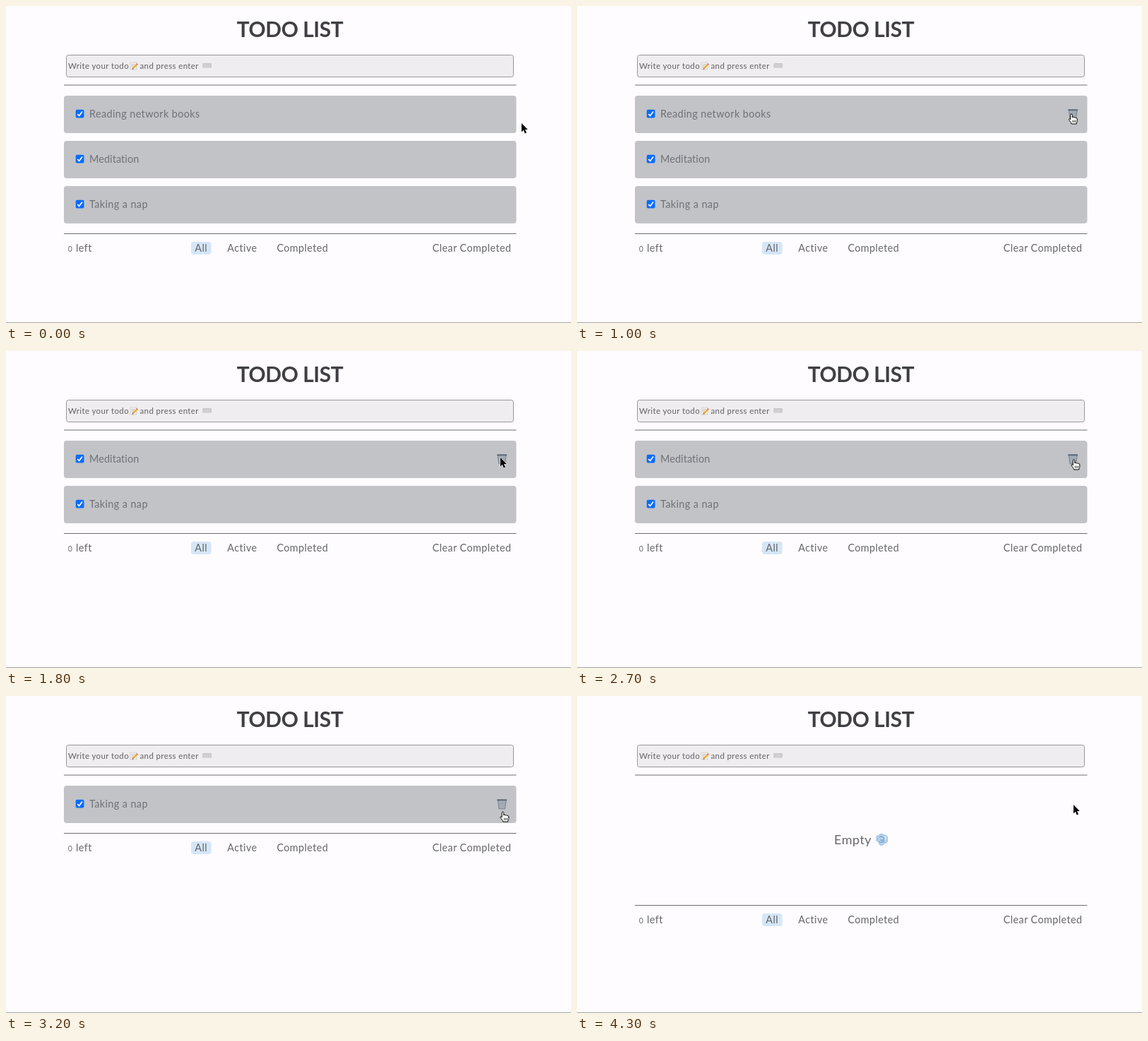
Recreate the animation shown at these times as an HTML page. Size 800 by 449 pixels, loop 6.9 s.

```html
<!DOCTYPE html>
<html lang="en">
<head>
<meta charset="utf-8">
<title>Todo list</title>
<style>
  html, body { margin: 0; width: 100%; height: 100%; overflow: hidden; background: #fefcff; }
  svg { display: block; width: 100%; height: 100%; }
  text { font: 400 14.4px Lato, "Open Sans", sans-serif; letter-spacing: .4px; fill: #66666a; }
  .title { font-size: 30px; font-weight: 700; letter-spacing: -.5px; fill: #3f3f44; }
  .hint { font-size: 11.5px; letter-spacing: .38px; fill: #626166; }
  .item { fill: #707176; }
  .tight { letter-spacing: .1px; }
  .zero { font: 400 10.6px Inter, sans-serif; }
  .empty { font-size: 18px; letter-spacing: .5px; }
  .rule { stroke: #6d6c70; stroke-width: 1; }
</style>
</head>
<body>
<svg viewBox="0 0 800 449">
  <defs>
    <g id="card">
      <rect x="82" y="127" width="640.5" height="53" rx="4" fill="#c2c3c7"/>
      <rect x="98.7" y="146.8" width="11.8" height="11.8" rx="2" fill="#0a6cff"/>
      <path d="M101.3 153l2.3 2.5 4.4-5.9" fill="none" stroke="#fff" stroke-width="1.7"/>
    </g>
  </defs>

  <rect width="800" height="449" fill="#fefcff"/>
  <path d="M0 448.5H800" stroke="#a5a4a7"/>
  <text class="title" x="402" y="44" text-anchor="middle">TODO LIST</text>

  <rect x="85.5" y="69.5" width="633" height="31" rx="3" fill="#efedf0" stroke="#98969a"/>
  <text class="hint" x="88" y="88.5">Write your todo</text>
  <text class="hint" x="189.5" y="88.5">and press enter</text>
  <g id="memo">
    <path d="M176 80h8.8v10H176z" fill="#f7f6f4" stroke="#bcbab8" stroke-width=".6"/>
    <path d="M177.5 82.5h5.5M177.5 84.5h4M177.5 86.5h3" stroke="#9a999b" stroke-width=".6"/>
    <path d="M179.6 88.6l6-6.2" stroke="#f0aa32" stroke-width="2.3"/>
    <path d="M185 83l1.2-1.2" stroke="#d9776f" stroke-width="2.3"/>
    <path d="M178.4 89.8l.6-2 1.5 1.4z" fill="#4a4541"/>
  </g>
  <g id="keyboard">
    <rect x="278.4" y="81" width="12.6" height="6.6" rx="1" fill="#c3c2c5"/>
    <path d="M279.4 82.7h10.6M279.4 84.4h10.6M279.4 86.1h10.6" stroke="#e6e5e8" stroke-width=".9" stroke-dasharray="1 .4"/>
  </g>
  <path class="rule" d="M82 112H722.5"/>

  <g id="list"></g>

  <g id="blank">
    <text class="empty" x="364" y="210">Empty</text>
    <path d="M427 198c1-3 6-3 7-1 4-1 7 3 5 6 2 3-1 6-4 5-1 4-6 5-7 1-2-1-1-3 1-3-3 1-6-1-5-3 1-1 2 0 3 0-3-1-4-4-2-5z" fill="#b5d3ed" stroke="#85acd1" stroke-width=".8"/>
    <path d="M428 200c4-2 7 0 6 3s-4 2-4 0M429 207c3 1 5 0 6-2" fill="none" stroke="#6f9bc6" stroke-width="1.1"/>
    <path d="M435 199c3 0 3 3 2 5" fill="none" stroke="#e5f1fb" stroke-width="1.3"/>
  </g>

  <g id="footer">
    <path class="rule" d="M82 322.5H722.5"/>
    <rect x="262" y="334" width="28.7" height="18" rx="4" fill="#d5e6f7"/>
    <text class="zero" x="87.6" y="348">0</text>
    <text x="99" y="348">left</text>
    <text x="267.3" y="348">All</text>
    <text x="313.3" y="348">Active</text>
    <text x="383.4" y="348">Completed</text>
    <text x="603.8" y="348">Clear Completed</text>
  </g>

  <g id="bin">
    <path d="M696.3 147.5h12l-1.7 12.3h-8.6z" fill="#929ca8" stroke="#6c7784" stroke-width=".8"/>
    <path d="M698.9 148l1 11.5M701 148l.4 11.5M703.6 148l-.4 11.5M705.7 148l-1 11.5M697 151h10.6M697.4 154h9.8M697.8 157h9" stroke="#b5bdc6" stroke-width=".6"/>
    <path d="M695.3 147.2h13.8" stroke="#4c5866" stroke-width="1.5"/>
  </g>

  <path id="arrow" d="M0 0V12.4L2.8 9.7 4.8 14.4 7 13.4 5 8.9H8.8Z" fill="#000" stroke="#fff" stroke-width="1" paint-order="stroke"/>
  <g id="hand" stroke="#000" stroke-width="1">
    <path d="M-1.3 1.2C-1.3-.4 1.2-.4 1.3 1.2V5C1.6 3.8 3.6 4 3.8 5.2 4.2 4.4 6 4.6 6.2 5.8 6.8 5.2 8.3 5.4 8.3 7V9.5C8.3 11.5 7.3 12 7.2 14H.2C0 12-2 10.5-3.3 8.6-4.2 7.2-2.8 6.2-1.3 7.8Z" fill="#fff"/>
    <path d="M2 8.8v3M4 8.8v3M6 8.8v3" stroke-width=".8"/>
  </g>
</svg>
<script>
  const LOOP = 6900, STEP = 100;
  const $ = id => document.getElementById(id);
  const show = (el, on) => el.setAttribute('display', on ? 'inline' : 'none');
  const place = (el, x, y) => el.setAttribute('transform', `translate(${x} ${y})`);

  // Each todo: label, removal time, extra text class
  const todos = [
    ['Reading network books', 1100, ''],
    ['Meditation', 2800, 'tight'],
    ['Taking a nap', 4200, '']
  ];
  // Pointer path: time, x, y
  const path = [
    [0, 730, 166], [100, 729, 166], [500, 702, 155], [800, 700, 153],
    [1100, 700, 153], [1500, 700, 151], [1900, 700, 151], [2200, 703.5, 154],
    [2800, 703.5, 154], [3100, 703.5, 163], [3200, 703.5, 164],
    [3400, 703.5, 162], [3800, 702, 154], [4100, 702, 154], [4200, 703, 154], [LOOP, 703, 154]
  ];
  // Spans in which the pointer is a hand
  const grabs = [[500, 1100], [2100, 2800], [2900, 4200]];

  const cards = todos.map(([label, end, cls]) => {
    $('list').insertAdjacentHTML('beforeend',
      `<g><use href="#card"/><text class="item ${cls}" x="118" y="158">${label}</text></g>`);
    return { el: $('list').lastElementChild, end };
  });

  function pointerAt(t) {
    const i = path.findIndex(p => p[0] > t);
    const [t0, x0, y0] = path[i - 1], [t1, x1, y1] = path[i];
    const k = (t - t0) / (t1 - t0);
    return [x0 + (x1 - x0) * k, y0 + (y1 - y0) * k];
  }

  function draw(t) {
    let rows = 0;
    for (const { el, end } of cards) {
      const alive = t < end;
      show(el, alive);
      if (alive) place(el, 0, 64 * rows++);
    }
    place($('footer'), 0, rows ? 64 * (rows - 3) : -26);
    show($('blank'), !rows);

    const [x, y] = pointerAt(t);
    const grab = grabs.some(([a, b]) => t >= a && t < b);
    show($('bin'), rows && x < 722);
    show($('hand'), grab);
    show($('arrow'), !grab);
    place($(grab ? 'hand' : 'arrow'), x, y);
  }

  const start = performance.now();
  function tick() {
    const t = (performance.now() - start) % LOOP;
    draw(Math.floor(t / STEP) * STEP);
    requestAnimationFrame(tick);
  }
  tick();
</script>
</body>
</html>
```
